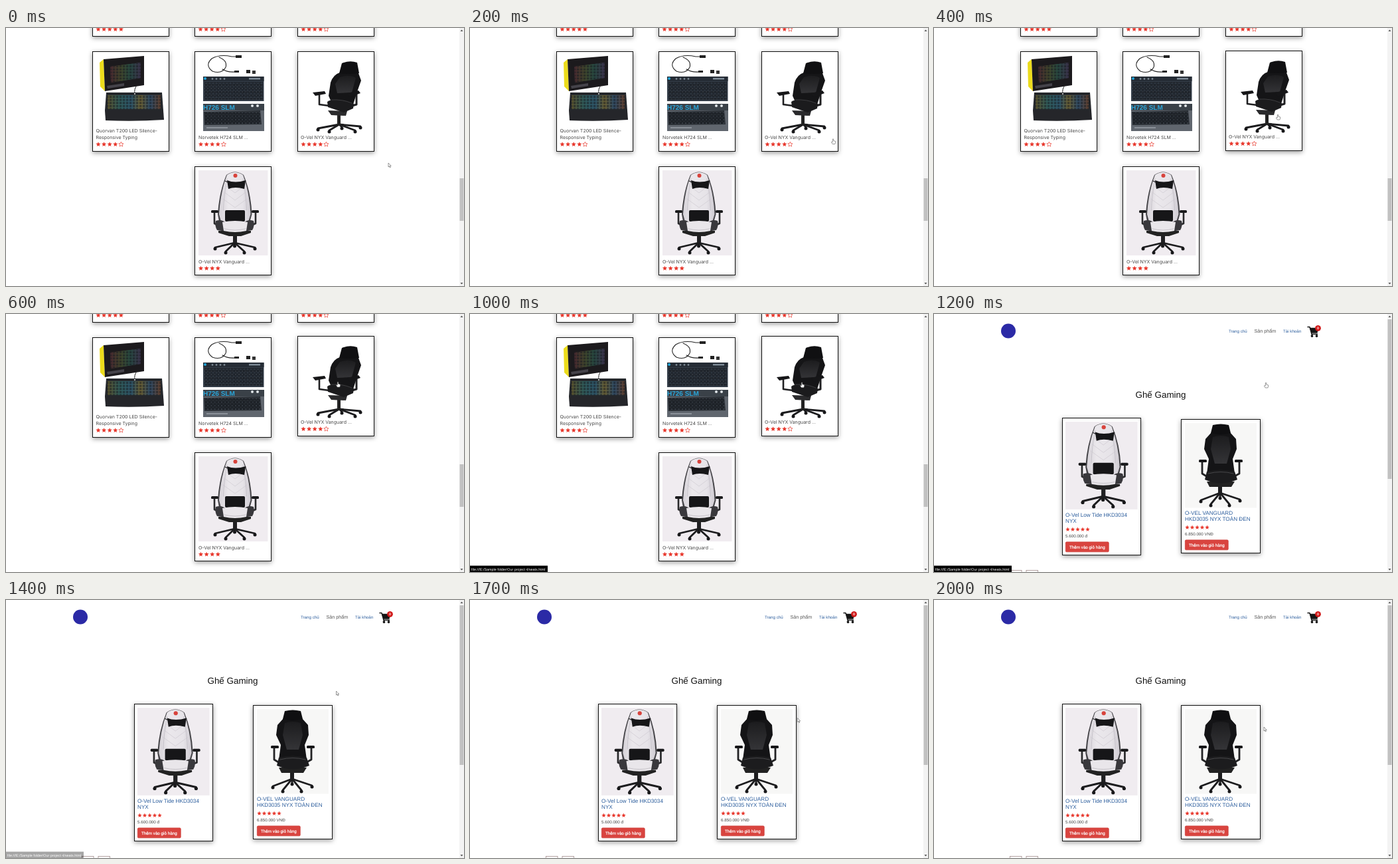
These frames come from a looping animation (690 px wide and 388 px high, 2100 ms). An HTML page:

```html
<!DOCTYPE html>
<html lang="vi">
<head>
<meta charset="utf-8">
<style>
html, body { margin: 0; width: 100%; height: 100%; overflow: hidden; background: #fff; }
svg { display: block; width: 690px; height: 388px; }
text { font-family: "Liberation Sans", Arial, sans-serif; white-space: pre; text-rendering: geometricPrecision; }
.label { font: 7px Inter, sans-serif; fill: #484848; }
.card { fill: #fff; stroke: #111; filter: drop-shadow(0 2.5px 3.5px #0006); }
</style>
</head>
<body>
<svg id="stage" viewBox="0 0 690 388" xmlns="http://www.w3.org/2000/svg"></svg>
<script>
const RED = '#e8382d', LINK = '#2a5c9c';

const rect = (x, y, w, h, fill, more = '') =>
  `<rect x="${x}" y="${y}" width="${w}" height="${h}" fill="${fill}" ${more}/>`;
const path = (d, fill, more = '') => `<path d="${d}" fill="${fill}" ${more}/>`;
const line = (d, color, w = 1) =>
  path(d, 'none', `stroke="${color}" stroke-width="${w}" stroke-linecap="round" stroke-linejoin="round"`);
const dot = (x, y, r, fill) => `<circle cx="${x}" cy="${y}" r="${r}" fill="${fill}"/>`;
const text = (x, y, s, size, fill, more = '') =>
  `<text x="${x}" y="${y}" font-size="${size}" fill="${fill}" ${more}>${s}</text>`;
const label = (x, y, s) => `<text class="label" x="${x}" y="${y}">${s}</text>`;
const card = (x, y, w, h, id = '') =>
  `<rect class="card" ${id && `id="${id}"`} x="${x + .5}" y="${y + .5}" width="${w}" height="${h}"/>`;
const group = (id, body) => `<g id="${id}">${body}</g>`;

function star(x, y, r, full) {
  const pts = Array.from({ length: 10 }, (_, i) => {
    const a = i * Math.PI / 5, k = i % 2 ? r * .45 : r;
    return `${(x + k * Math.sin(a)).toFixed(2)},${(y - k * Math.cos(a)).toFixed(2)}`;
  });
  return `<polygon points="${pts.join(' ')}" fill="${full ? RED : '#fff'}" stroke="${RED}" stroke-width="${full ? 0 : .7}"/>`;
}
const stars = (x, y, full, total = 5, step = 8.6, r = 3.8) =>
  Array.from({ length: total }, (_, i) => star(x + i * step, y, r, i < full)).join('');

// Five-legged chair base with wheels
const base = (x, y, feet) => feet.map(([fx, fy]) =>
  line(`M${x} ${y}L${fx} ${fy - 2}`, '#1c1c1e', 2.8) + dot(fx, fy, 2.5, '#18181a')).join('');

const defs = `<defs>
  <linearGradient id="rgb">
    <stop stop-color="#8a7a32"/><stop offset=".22" stop-color="#3f8a82"/><stop offset=".45" stop-color="#3a7fa0"/>
    <stop offset=".62" stop-color="#a8923c"/><stop offset=".8" stop-color="#3d6f9c"/><stop offset="1" stop-color="#9a5a34"/>
  </linearGradient>
  <linearGradient id="dim">
    <stop stop-color="#6d3038"/><stop offset=".35" stop-color="#5c6430"/><stop offset=".65" stop-color="#2f6a58"/><stop offset="1" stop-color="#55406c"/>
  </linearGradient>
  <linearGradient id="leather">
    <stop stop-color="#d6d2d8"/><stop offset=".3" stop-color="#ebe8ec"/><stop offset=".75" stop-color="#e6e3e8"/><stop offset="1" stop-color="#cfcbd2"/>
  </linearGradient>
  <linearGradient id="mesh" x2="0" y2="1"><stop stop-color="#1c1c1e"/><stop offset="1" stop-color="#343437"/></linearGradient>
  <pattern id="keys" width="5" height="4.6" patternUnits="userSpaceOnUse">
    <path d="M0 0h5v4.6h-5z" fill="#1b1e24" fill-opacity=".4"/><rect x=".8" y=".8" width="3.6" height="3.2" fill="#191c22" fill-opacity=".6"/>
  </pattern>
  <pattern id="caps" width="5.2" height="5.2" patternUnits="userSpaceOnUse">
    <rect x=".5" y=".6" width="4.3" height="4.2" rx=".5" fill="#161a20"/><path d="M2 2.6h1.3" stroke="#8d99a5" stroke-width=".8"/>
  </pattern>
</defs>`;

const glowBoard =
  path('M141 52L147 47L149 95L142 88Z', '#ecdc1c') +
  path('M147 47L208 42V86L149 95Z', '#1c1a1d') +
  path('M157 58L203 52V75L158 82Z', 'url(#dim)') + path('M157 58L203 52V75L158 82Z', 'url(#keys)') +
  path('M152 87L178 83V87L153 91Z', '#45434a') +
  line('M194 98Q193 92 196 88', '#222') +
  path('M151 97H235L237 124H149Z', '#24272b') +
  rect(153, 101, 80, 21, 'url(#rgb)') + rect(153, 101, 80, 21, 'url(#keys)') +
  path('M149 124H237L238 138Q194 141 150 139Z', '#25262a') + dot(194, 99, 1.1, '#ddd');

const slimBoard =
  line('M354 43H340Q322 39 310 46Q299 56 311 65Q325 70 331 59Q334 49 321 44', '#222', 1.1) +
  line('M326 62Q334 67 345 66', '#222', 1.1) + rect(346, 41, 9, 4, '#222') + rect(344, 64, 7, 3, '#222') +
  rect(362, 63, 6, 5, '#222') + rect(371, 64, 5, 5, '#333') +
  rect(297, 73, 91.5, 37, '#343d48') + rect(297, 73, 91.5, 7, '#252c35') + dot(300, 76, 2, '#22a8dc') +
  [311, 317, 323, 329].map(x => dot(x, 76.5, 1.4, '#77838e')).join('') + rect(366, 75, 17, 2.5, '#7b8894') +
  rect(299, 81, 88, 27, 'url(#caps)') +
  rect(297, 114, 92, 41, '#60666e') + rect(297, 114, 92, 10, '#3a4148') +
  text(297, 123, 'H726 SLM', 10, '#2aa4d8', 'font-weight="bold"') +
  dot(371, 117, 2, '#dfe4e8') + dot(379, 117, 2, '#dfe4e8') +
  path('M298 126L383 124L385 145L299 146Z', '#2b3036') + rect(300, 127, 83, 17, 'url(#caps)') +
  rect(302, 149, 32, 2, '#8a9098');

const sideChair =
  base(502, 145, [[470, 153], [487, 156], [526, 156], [534, 150], [506, 151]]) +
  rect(499, 126, 5, 20, '#222') + path('M485 124L514 125L512 132L490 131Z', '#2a2a2c') +
  line('M472 101V115L487 117', '#202022', 2.6) + line('M528 100V115L518 118', '#202022', 3) +
  path('M503 67Q517 63 531 68L535 79L529 96L523 115L490 111L486 102L489 82Q493 70 503 67Z', '#151517') +
  path('M503 74Q517 69 527 75L521 97L499 98L496 84Z', 'url(#mesh)') +
  path('M506 53Q518 48 529 52L532 68Q517 70 502 68Z', '#101012') +
  path('M484 111Q491 105 512 109L524 114L523 121L509 127L485 119Z', '#1b1b1d') +
  line('M490 108Q507 107 521 113', '#444447', .8) +
  path('M462 97L480 95L482 99L466 102Z', '#161618') + path('M514 98L531 94L534 98L518 104Z', '#161618');

const whiteChair =
  rect(290, 214, 104.5, 128, '#f0ecf0') +
  base(344.5, 323, [[315, 332], [331, 338], [359, 338], [375, 332], [344.5, 328]]) +
  rect(342, 305, 6, 18, '#202022') + path('M320 305H369V308L354 313H336L320 308Z', '#222') +
  line('M314 278V294L321 297', '#29292b', 2.6) + line('M376 278V294L368 297', '#29292b', 2.6) +
  path('M332 221Q345 212 358 221Q369 247 370.5 280L366 296H322L319 280Q321 247 332 221Z', '#444347') +
  path('M333 221Q345 213 357 221Q367 248 368.5 280L364 295H325L321 280Q323 247 333 221Z', 'url(#leather)') +
  line('M329 247L345 259L361 247M327 257L345 270L363 257M332 238L345 248L358 238', '#d2ced5', .8) +
  line('M333 227Q328 253 327.5 274M357 227Q362 253 362.5 274', '#c2bec6', .8) +
  line('M330 230L345 237L361 230', '#202022', 1.2) +
  path('M333 229Q345 234 361 229L359 242Q345 238 335 242Z', '#161618') +
  rect(330, 274, 30, 17, '#161618', 'rx="2"') +
  path('M316 290Q325 287 331 293L332 306L318 304Q314 297 316 290Z', '#39383c') +
  path('M373 290Q365 287 358 293L357 306L371 304Q375 297 373 290Z', '#39383c') +
  path('M326 292Q345 288 364 292L362 305Q345 309 328 305Z', '#e9e6ea') +
  line('M329 302Q345 306 361 302', '#bfbbc2', .8) +
  rect(309, 274, 11, 4, '#1b1b1d', 'rx="1.5"') + rect(370, 274, 11, 4, '#1b1b1d', 'rx="1.5"') +
  dot(345.5, 222, 3, '#d8433c');

const blackChair =
  rect(378, 164, 108, 127.5, '#f7f7f6') +
  base(431, 269, [[402, 282], [417, 288], [445, 288], [461, 281], [431, 277]]) +
  rect(428, 254, 6, 16, '#1d1d1f') + path('M411 252H453L448 260H415Z', '#222') +
  line('M404 223V240L412 245', '#222224', 2.8) + line('M460 223V240L451 245', '#222224', 2.8) +
  path('M418 178Q432 174 446 178L455 188L456 203L450 218L453 240H411L414 218L407 203L409 188Z', '#141416') +
  path('M420 185Q432 181 444 185L447 203L441 225H423L417 203Z', 'url(#mesh)') +
  path('M420 167Q432 164 444 167L447 179Q432 183 417 179Z', '#0f0f11') +
  path('M411 237Q432 232 453 237L457 249Q432 260 408 249Z', '#1c1c1e') +
  line('M413 240Q432 235 451 240', '#4c4c4f', .9) +
  rect(399, 219, 12, 4, '#161618', 'rx="1.5"') + rect(453, 219, 12, 4, '#161618', 'rx="1.5"');

const scrollbar = (y, h) => rect(683, 0, 7, 388, '#f3f3f3') + rect(683.5, y, 6, h, '#c1c1c1') +
  path('M684.5 5L686.5 2.5L688.5 5Z', '#555') + path('M684.5 383L686.5 385.5L688.5 383Z', '#555');

const listPage =
  [130, 284, 439].map((x, i) => card(x, -60, 115, 72) + stars(x + 9, 2, i ? 4 : 5)).join('') +
  card(130, 35, 115, 150) + glowBoard +
  label(135.5, 156.5, 'Quorvan T200 LED Silence-') + label(135.5, 167, 'Responsive Typing') + stars(139, 175, 4) +
  card(284, 35, 115, 150) + slimBoard + label(290, 167, 'Norvetek H724 SLM ...') + stars(293.5, 175, 4) +
  group('lift', card(439, 35, 115, 150) + sideChair + label(444, 167, 'O-Vel NYX Vanguard ...') + stars(448, 175, 4)) +
  card(284, 208, 115, 163) + whiteChair + label(290, 353.5, 'O-Vel NYX Vanguard ...') + stars(293.5, 361.5, 4, 4) +
  scrollbar(226, 64);

const details = (x, y, title, price) =>
  title.map((s, i) => text(x, y + i * 8.8, s, 8.17, LINK)).join('') +
  stars(x + 3.5, y + 19, 5, 5, 7.5, 3.4) + text(x, y + 30.6, price, 6.25, '#444') +
  rect(x + .3, y + 37.8, 65, 15, '#d9443f', 'rx="1.5" stroke="#c73531" stroke-width=".6"') +
  text(x + 6, y + 47.6, 'Thêm vào giỏ hàng', 6.28, '#fff', 'stroke="#fff" stroke-width=".2"');

const cart =
  line('M572 19.5H575L578 30.3H586.5', '#151515', 1.5) + path('M575 20.8H588.3L586.5 28.8H577.5Z', '#151515') +
  dot(578.5, 33, 1.9, '#151515') + dot(585.5, 33, 1.9, '#151515');

const shopPage =
  dot(112, 25.5, 11, '#2b2aa6') +
  group('nav', text(453, 28.3, 'Trang chủ', 6.2, LINK) + text(491.5, 28.3, 'Sản phẩm', 7.2, '#555') +
    text(535, 28.3, 'Tài khoản', 6.2, LINK) + cart +
    group('badge', dot(587.5, 21.3, 4.4, '#d01616') + text(586, 23.2, '0', 5.4, '#fff', 'font-weight="bold"'))) +
  text(303.5, 126, 'Ghế Gaming', 13.4, '#111') +
  card(193, 156, 118, 206) +
  `<g transform="translate(198 162) scale(1.04 1.03) translate(-290 -214)">${whiteChair}</g>` +
  details(198, 305, ['O-Vel Low Tide HKD3034', 'NYX'], '5.600.000 đ') +
  card(372, 158, 119, 201, 'frame') + group('photo', blackChair) +
  group('info', details(378, 302, ['O-VEL VANGUARD', 'HKD3035 NYX TOÀN ĐEN'], '6.850.000 VNĐ')) +
  [114.5, 139].map(x => rect(x, 385.5, 17.5, 10, '#fff', 'stroke="#a08a8a" stroke-width=".8"')).join('') +
  scrollbar(8, 240);

const status = rect(0, 378.5, 117, 9.5, '#000') +
  text(2, 385.5, 'file:///E:/Sample folder/Our project 4/seats.html', 5.4, '#fff');

const edge = 'stroke="#555" stroke-width=".6" stroke-linejoin="round"';
const arrow = path('M0 0V6L1.4 4.8L2.4 7L3.4 6.5L2.4 4.4H4.2Z', '#fff', edge);
const hand = path('M-.7 .6Q0 -.4 .7 .6V3L3.6 3.9V6L2.8 8H-.8L-2.6 5.2Q-2.6 4-.7 5Z', '#fff', edge);

const $ = id => document.getElementById(id);
$('stage').innerHTML = defs + group('list', listPage) + group('shop', shopPage) + group('status', status) +
  group('cursor', group('arrow', arrow) + group('hand', hand));

// time, x, y of the pointer tip
const track = [
  [0, 576, 203], [400, 518, 130], [600, 500, 102], [1200, 500, 103], [1300, 498.5, 115],
  [1400, 497.5, 137], [1800, 492, 191], [1900, 495, 191], [2000, 497, 191], [2100, 497, 191]
];
function pointer(t) {
  const i = track.findIndex(k => k[0] > t), [t0, x0, y0] = track[i - 1], [t1, x1, y1] = track[i];
  const k = (t - t0) / (t1 - t0);
  return [x0 + (x1 - x0) * k, y0 + (y1 - y0) * k];
}
const clamp = v => Math.max(0, Math.min(1, v));
const show = (id, on) => $(id).setAttribute('display', on ? 'inline' : 'none');
const move = (id, x, y) => $(id).setAttribute('transform', `translate(${x} ${y})`);

function draw(now) {
  const t = Math.floor(now % 2100 / 100) * 100;
  const shop = t >= 1100, loaded = t >= 1200, over = t >= 200 && t < 1300;
  show('list', !shop);
  show('shop', shop);
  move('lift', 0, -2 * clamp((t - 200) / 400));

  // The second card grows once its picture has loaded
  show('photo', loaded);
  show('badge', loaded);
  move('nav', loaded ? -9 : 0, 0);
  move('info', 0, loaded ? 0 : -59);
  $('frame').setAttribute('y', loaded ? 158.5 : 217.5);
  $('frame').setAttribute('height', loaded ? 201 : 83);

  $('status').setAttribute('opacity', t < 800 ? 0 : t < 1400 ? 1 : t < 1500 ? .35 : 0);
  move('cursor', ...pointer(t));
  show('hand', over);
  show('arrow', !over);
  requestAnimationFrame(() => draw(performance.now() - start));
}
const start = performance.now();
draw(0);
</script>
</body>
</html>
```
